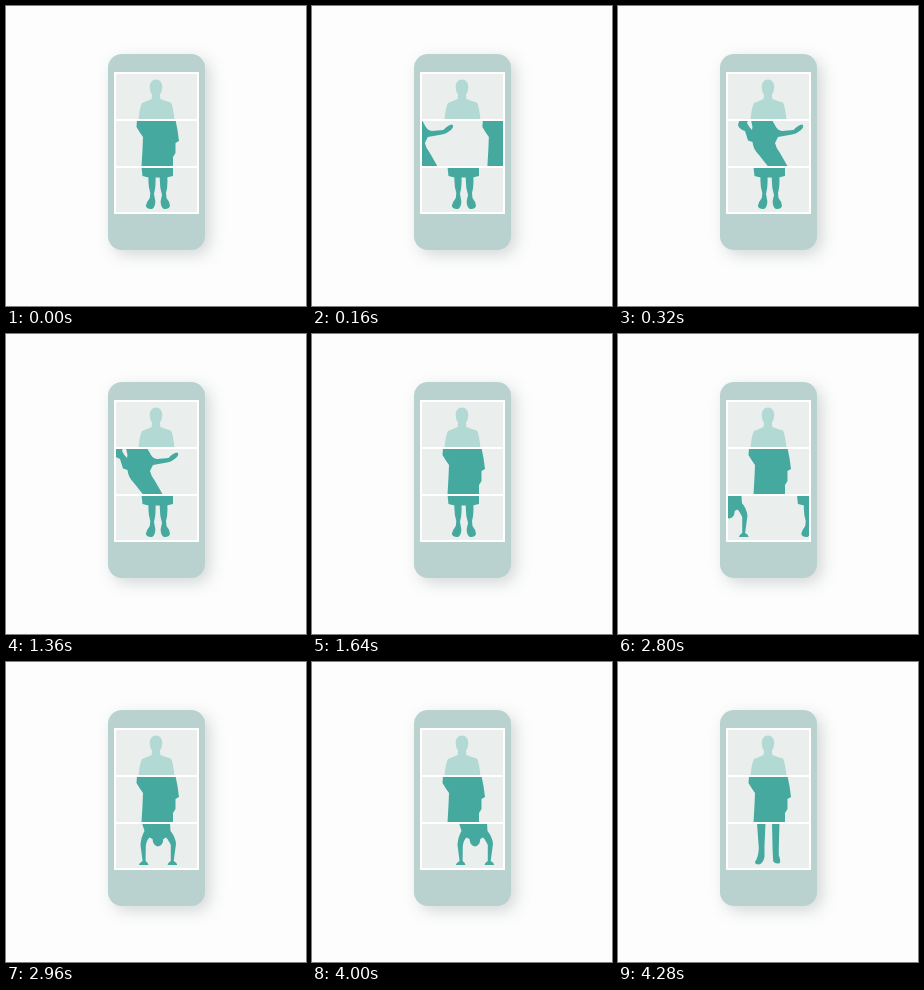
Write an HTML page with a canvas that moves like this. It is 300 px wide and 300 px high and loops after 4320 ms.

```html
<!DOCTYPE html>
<html lang="en">
<head>
<meta charset="utf-8">
<title>Mix and match figure</title>
<style>
html, body { margin: 0; width: 100%; height: 100%; overflow: hidden; background: #fdfdfd; }
canvas { display: block; width: 300px; height: 300px; }
</style>
</head>
<body>
<canvas id="stage"></canvas>
<script>
const LOOP = 4320, STEP = 40, PITCH = 84;
const TEAL = '#45a99f', PALE = '#b3d9d4', CELL = '#eaefee';

const canvas = document.getElementById('stage');
const ctx = canvas.getContext('2d');
const dpr = window.devicePixelRatio || 1;
canvas.width = canvas.height = 300 * dpr;

const rows = {
  head: [68, 45],
  body: [115, 45],
  legs: [162, 44]
};

const figures = {
  bust: new Path2D(`M150 73.5 C154 73.5 156.5 77 156.2 81.5 Q156 86 154 88.5
    L154.3 93 Q160 95 165 96.5 Q167 100 168.5 114 L132.5 114
    Q133.5 101 136 97 Q141 95 145.6 93 L146 88.5 Q143.8 86 143.7 81.5
    C143.5 77 146 73.5 150 73.5 Z`),

  robe: new Path2D(`M131 114 L169.5 114 L171.5 124 L173 135 L169.5 137
    L169.5 147 L167 151 L167 161 L135.5 161 L136.5 143 L137 131
    Q134 127 130.5 121 Z`),

  dancer: new Path2D(`M121.5 114 L130 114 L129 117 Q131.5 122 134 124
    L134.5 121 L133 114 L154 114 L158 121 Q160 124.5 164 125 L175.5 124
    Q180 119 184 118.5 Q187 120 183 124 Q178 128 174 128.5 L160 131
    L157 137 Q158 142 162 147 L170 161 L150.5 161 L141 149
    Q135 143 134.5 136 L130 134.5 Q128 128 127 125 Q121 123 120 119 Z`),

  skirt: new Path2D(`M135.5 161 L167 161 L167 170 Q163 170.5 161.3 171.5
    Q162 180 160 187 L160.5 192 Q164 196 164 200 Q163 203.5 158 203
    Q154.5 201 154.7 195 L156 189 Q153.5 181 153.8 171.5 L149.5 171.5
    Q150 181 148 188 L149.3 195 Q149.5 201 146 203 Q141 203.5 139.8 200
    Q140.5 196 143.8 192 L144.3 187 Q142 180 142.5 171.5 L136.5 170 Z`),

  handstand: new Path2D(`M136 161 L164 161 L164.5 169 Q169.5 175 170 182
    L167.7 199 Q171.5 201 171 203 L161.5 203 Q162 200.5 164.8 199
    L164.8 183 Q162 177 160 175.5 L157.3 177 Q157 184 152 184.5
    Q147 184 146.5 177 L143.5 175.5 Q140.5 178 139.8 184 L139.6 199
    Q142 200.5 142.5 203 L133 203 Q132.8 201 136.6 199 L134.5 183
    Q135 175 138.5 169 Z`),

  trousers: new Path2D(`M139 161 L147.5 161 L146.5 184 L146.5 195
    Q145 201.5 141 202.5 Q137 202.5 137 200 Q140.5 195 140.8 186 Z
    M154 161 L161.5 161 L160.8 185 L160.8 193 Q162.8 199 161.8 201
    Q158 202.5 155.2 199.5 L154.6 188 Z`)
};

// dir: 1 slides right, -1 slides left
const swipes = [
  { row: 'body', at: 80,   steps: 7, dir: 1,  pow: 1.15, from: 'robe',      to: 'dancer' },
  { row: 'body', at: 1360, steps: 8, dir: -1, pow: 1.26, from: 'dancer',    to: 'robe' },
  { row: 'legs', at: 2680, steps: 8, dir: 1,  pow: 1.05, from: 'skirt',     to: 'handstand' },
  { row: 'legs', at: 4000, steps: 8, dir: 1,  pow: 1.05, from: 'handstand', to: 'trousers' }
];

function drawFigure(name, dx, color) {
  ctx.save();
  ctx.translate(dx, 0);
  ctx.fillStyle = color;
  ctx.fill(figures[name]);
  ctx.restore();
}

function drawRow(row, start, t) {
  const [y, h] = rows[row];
  ctx.save();
  ctx.beginPath();
  ctx.rect(110, y, 81, h);
  ctx.clip();
  ctx.fillStyle = CELL;
  ctx.fillRect(110, y, 81, h);

  let shown = start, next = null, shift = 0, dir = 0;
  for (const s of swipes) {
    if (s.row !== row || t < s.at) continue;
    const p = Math.min(1, (Math.floor((t - s.at) / STEP) + 1) / s.steps);
    shown = p < 1 ? s.from : s.to;
    next = p < 1 ? s.to : null;
    dir = s.dir;
    shift = p < 1 ? dir * PITCH * (1 - Math.pow(1 - p, s.pow)) : 0;
  }
  const color = row === 'head' ? PALE : TEAL;
  drawFigure(shown, shift, color);
  if (next) drawFigure(next, shift - dir * PITCH, color);
  ctx.restore();
}

function drawPhone() {
  ctx.save();
  ctx.shadowColor = 'rgba(70, 85, 85, 0.22)';
  ctx.shadowBlur = 16 * dpr;
  ctx.shadowOffsetX = 5 * dpr;
  ctx.shadowOffsetY = 5 * dpr;
  ctx.fillStyle = '#bad2cf';
  ctx.beginPath();
  ctx.roundRect(102, 48, 97, 196, 14);
  ctx.fill();
  ctx.restore();
  ctx.fillStyle = '#fff';
  ctx.fillRect(108, 66, 85, 142);
}

function draw(now) {
  const t = now % LOOP;
  ctx.setTransform(dpr, 0, 0, dpr, 0, 0);
  ctx.fillStyle = '#fdfdfd';
  ctx.fillRect(0, 0, 300, 300);
  drawPhone();
  drawRow('head', 'bust', t);
  drawRow('body', 'robe', t);
  drawRow('legs', 'skirt', t);
}

let began = null;
function tick(now) {
  if (began === null) began = now;
  draw(Math.max(0, now - began));
  requestAnimationFrame(tick);
}
draw(0);
requestAnimationFrame(tick);
</script>
</body>
</html>
```
